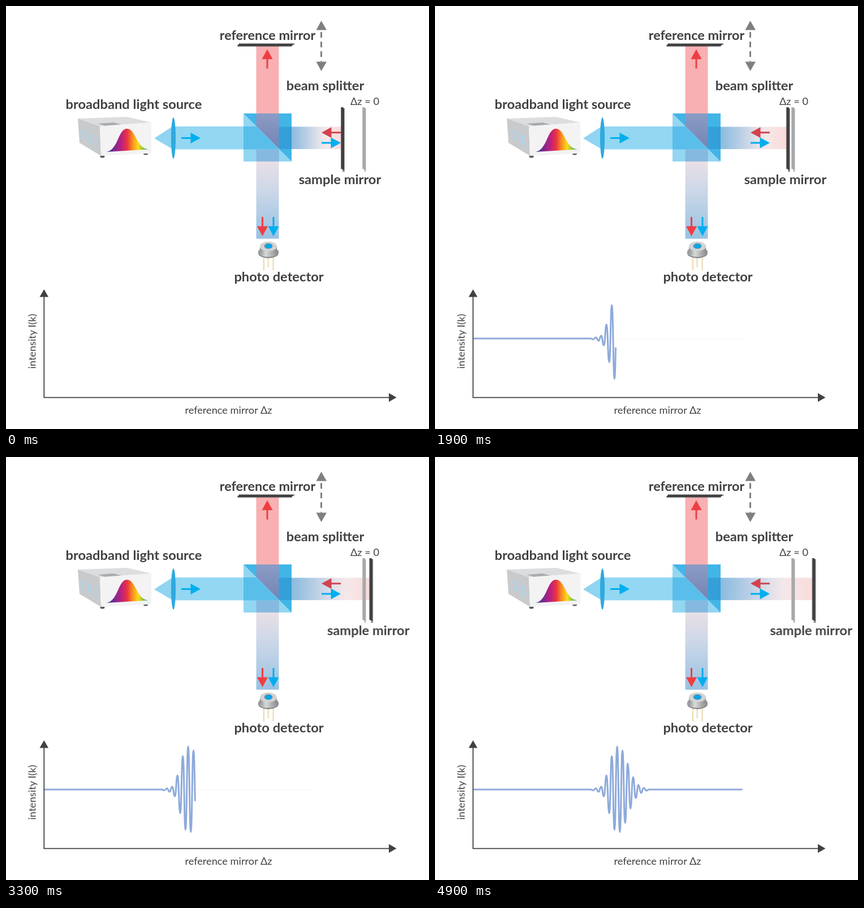
Animation, 748 px wide and 748 px high, one loop 5 s. Source, as an HTML page:

```html
<!DOCTYPE html>
<html lang="en">
<head>
<meta charset="utf-8">
<title>Interferometer</title>
<style>
  html, body { margin: 0; width: 100%; height: 100%; overflow: hidden; background: #fff; }
  svg { display: block; width: 100%; height: 100%; }
  text { font-family: Lato, "Open Sans", sans-serif; fill: #414042; text-anchor: middle; }
  .label { font-weight: 700; font-size: 23.7px; }
  .axis { font-size: 18.2px; }
  .red { color: #ef3e42; }
  .dim { color: #d2434e; }
  .blue { color: #00aeef; }

  .slide { animation: slide 5s steps(50) infinite; }
  .stretch { transform-origin: 505px 0; animation: stretch 5s steps(50) infinite; }
  .trace { stroke-dasharray: 49 60; animation: trace 5s steps(50) infinite; }
  .hint { transform-origin: 316px 0; animation: hint 5s step-end infinite; }

  @keyframes slide { to { transform: translateX(76.1px); } }
  @keyframes stretch { to { transform: scaleX(1.865); } }
  @keyframes trace { from { stroke-dashoffset: 49; } to { stroke-dashoffset: -1; } }
  @keyframes hint {
    0% { transform: scaleX(0); }
    26% { transform: scaleX(.105); }
    38%, 100% { transform: scaleX(1); }
  }
</style>
</head>
<body>
<svg viewBox="0 0 748 748">
  <defs>
    <linearGradient id="sampleBeam">
      <stop offset="0" stop-color="#8bbbe0"/>
      <stop offset=".3" stop-color="#b9cfe5"/>
      <stop offset=".55" stop-color="#e3e2ea"/>
      <stop offset=".7" stop-color="#f5e8e9"/>
      <stop offset="1" stop-color="#fbdbdb"/>
    </linearGradient>
    <linearGradient id="outBeam" x2="0" y2="1">
      <stop offset="0" stop-color="#e9dfe5"/>
      <stop offset=".35" stop-color="#ced8e8"/>
      <stop offset="1" stop-color="#97c2e3"/>
    </linearGradient>
    <linearGradient id="mix" x2="0" y2="1">
      <stop offset="0" stop-color="#8a9cc6"/>
      <stop offset="1" stop-color="#7683b3"/>
    </linearGradient>
    <linearGradient id="spectrum">
      <stop offset="0" stop-color="#2b3990"/>
      <stop offset=".2" stop-color="#7b2a90"/>
      <stop offset=".37" stop-color="#c0207c"/>
      <stop offset=".5" stop-color="#ec3440"/>
      <stop offset=".63" stop-color="#f7941d"/>
      <stop offset=".76" stop-color="#fddc1c"/>
      <stop offset=".88" stop-color="#7fc242"/>
      <stop offset="1" stop-color="#1a9a8a"/>
    </linearGradient>
    <linearGradient id="metal">
      <stop offset="0" stop-color="#8f9193"/>
      <stop offset=".35" stop-color="#d9dadb"/>
      <stop offset="1" stop-color="#8a8c8e"/>
    </linearGradient>
    <g id="arrow">
      <path d="M0 0H18" stroke="currentColor" stroke-width="3"/>
      <path d="M34 0L16.5 -9.5V9.5Z" fill="currentColor"/>
    </g>
    <g id="mirror">
      <path d="M592.3 179H596.3L598 183V291L596.3 289L592.3 288Z" fill="currentColor"/>
      <path d="M597 181V293" stroke="currentColor" stroke-width="3.4" stroke-dasharray="1.7 1"/>
    </g>
  </defs>

  <!-- light source -->
  <ellipse cx="170.500" cy="266" rx="4" ry="2.500" fill="#58595b"/>
  <ellipse cx="247" cy="261" rx="4" ry="2.500" fill="#58595b"/>
  <path d="M127 199L214 196L257 206L166 212.500Z" fill="#dcddde"/>
  <path d="M127 199L166 212.500L168 265L130 242Z" fill="#c9cacc"/>
  <path d="M166 212.500L257 206V260.500L168 265Z" fill="#f3f3f4"/>
  <path d="M162 208L190 206L204 209.500L175 211.800Z" fill="#a9abae"/>
  <g fill="none" stroke="#a5d8f3" stroke-width="1.400">
    <path d="M135 219V235M140 221V238M145 223V240M150 225V242M155 227V244M159 229V245" stroke-dasharray="7 2"/>
    <path d="M134 219L142 222M147 232L153 235M153 243L160 246"/>
  </g>
  <path d="M177 258C199 255 198 217 214 217C230 217 230 252 252 253.500Z" fill="url(#spectrum)"/>

  <!-- beams -->
  <path d="M262 234L296 212V254Z" fill="#8fd4f1"/>
  <rect x="296" y="213" width="124" height="40.500" fill="#93d7f2"/>
  <ellipse cx="296" cy="233.500" rx="4" ry="36.500" fill="#2ea9df"/>
  <rect x="442.500" y="71" width="40" height="119" fill="#f8b0b2"/>
  <rect x="442.500" y="275" width="40" height="136.500" fill="url(#outBeam)"/>
  <rect class="stretch" x="505" y="213.500" width="88" height="39.500" fill="url(#sampleBeam)"/>

  <!-- beam splitter -->
  <path d="M420 190H505V275Z" fill="#42b5e7"/>
  <path d="M420 190V275H505Z" fill="#93d6f1"/>
  <path d="M420 213H443L483 253.500H420Z" fill="#59bfea"/>
  <path d="M442.500 190H482.500V252.500L442.500 212.500Z" fill="url(#mix)"/>
  <path d="M482.500 213.500H505V253H482.500Z" fill="#359fd8"/>
  <path d="M442.500 253.500H483L482.500 275H442.500Z" fill="#86b9df"/>
  <path d="M420 190L505 275" stroke="#7cc9ec" stroke-width=".8"/>

  <!-- arrows -->
  <use href="#arrow" class="red" transform="translate(462 110.500) rotate(-90)"/>
  <use href="#arrow" class="blue" x="310" y="233.500"/>
  <use href="#arrow" class="dim" transform="translate(592 223.800) rotate(180)"/>
  <use href="#arrow" class="blue" x="558" y="242"/>
  <use href="#arrow" class="red" transform="translate(453.500 373) rotate(90)"/>
  <use href="#arrow" class="blue" transform="translate(473 373) rotate(90)"/>
  <g fill="#7f7f82">
    <path d="M557.500 26L567 42.500H548.500ZM557.500 115L567 98.500H548.500Z"/>
    <path d="M557.500 46V98" stroke="#7f7f82" stroke-width="3" stroke-dasharray="10 7"/>
  </g>

  <!-- mirrors -->
  <g color="#414042">
    <path d="M409.500 71.500V69L413 67H508L505 71.500Z" fill="currentColor"/>
    <path d="M412 67.500H510" stroke="currentColor" stroke-width="3.200" stroke-dasharray="1.700 1"/>
  </g>
  <use href="#mirror" color="#a7a9ac" x="38"/>
  <g class="slide">
    <use href="#mirror" color="#414042"/>
    <text class="label" x="590.500" y="315">sample mirror</text>
  </g>

  <!-- detector -->
  <path d="M456 443V467.500M463.500 443V462M472.500 443V467.500" stroke="#e6d5a3" stroke-width="1.800"/>
  <ellipse cx="464" cy="437" rx="18" ry="9" fill="#85878a"/>
  <ellipse cx="464" cy="435" rx="18" ry="8.800" fill="url(#metal)"/>
  <path d="M449 425V434A15 8 0 0 0 479 434V425Z" fill="url(#metal)"/>
  <ellipse cx="464" cy="425" rx="15" ry="8.500" fill="#d1d3d4"/>
  <ellipse cx="464" cy="424.500" rx="7.500" ry="5" fill="#8c9094"/>
  <ellipse cx="464.300" cy="424.800" rx="6.300" ry="4.200" fill="#0aa5e6"/>

  <!-- labels -->
  <g class="label">
    <text x="462.500" y="60" font-size="23.400">reference mirror</text>
    <text x="564.500" y="148.500">beam splitter</text>
    <text x="226" y="181.500">broadband light source</text>
    <text x="482.500" y="487">photo detector</text>
  </g>
  <g class="axis">
    <text x="634.500" y="175">Δz = 0</text>
    <text x="393.500" y="720.500">reference mirror Δz</text>
    <text transform="translate(52.500 593) rotate(-90)">intensity I(k)</text>
  </g>

  <!-- chart -->
  <path class="hint" d="M316 588H545" stroke="#f2f2f5"/>
  <path id="trace" class="trace" pathLength="49" fill="none" stroke="#8eaadb" stroke-width="3" stroke-linejoin="round"/>
  <path d="M67.300 512V692.300H679" fill="none" stroke="#414042" stroke-width="1.800"/>
  <path d="M67.300 501L75 514.500H59.500ZM690.500 692.300L677 684.500V700Z" fill="#414042"/>
</svg>
<script>
  // Turning points of the fringe packet, evenly spaced along x
  const base = 588, step = 4.7, first = 279.8;
  const turns = [589.5, 586, 592, 583, 600, 563, 630, 529, 659, 512, 663,
                 519, 647, 542, 622, 566, 603, 580, 594, 585, 590, base];
  let d = `M67 ${base}H${first - step}`, prev = base;
  turns.forEach((y, i) => {
    const x = first + i * step, mid = x - step / 2;
    d += `C${mid} ${prev} ${mid} ${y} ${x} ${y}`;
    prev = y;
  });
  document.getElementById('trace').setAttribute('d', d + 'H543.5');
</script>
</body>
</html>
```
